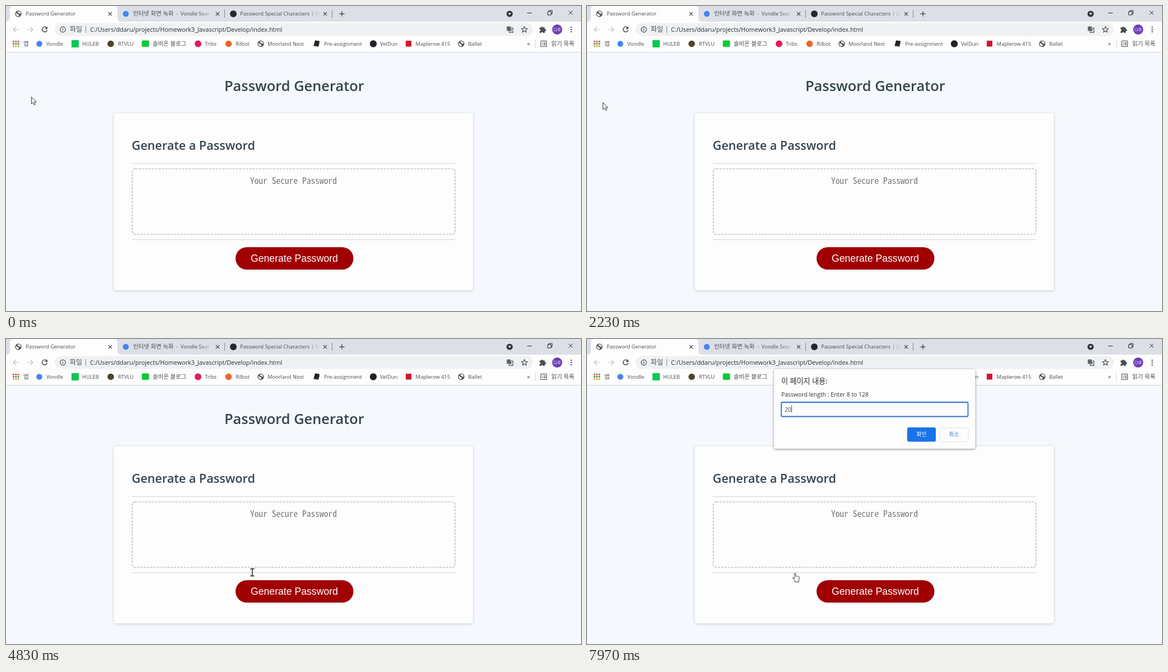
Write an HTML page that moves like this. It is 1027 px wide and 545 px high and loops after 8 s.

```html
<!DOCTYPE html>
<html lang="ko">
<head>
<meta charset="utf-8">
<title>Password Generator</title>
<style>
html, body { margin: 0; width: 100%; height: 100%; overflow: hidden; background: #f5f9fd; }
svg { display: block; width: 100%; height: 100%; }
text { font-family: "Open Sans", "Noto Sans CJK KR", "Noto Sans CJK", sans-serif; font-size: 9.35px; fill: #4a4d51; white-space: pre; }
.ko { font-size: 10.4px; }
.head { font-weight: 600; fill: #35444f; }
.mono { font: 15.5px "Noto Sans Mono CJK KR", "Noto Sans Mono", monospace; fill: #757575; }
.arial { font: 17.65px "Liberation Sans", Arial, sans-serif; fill: #fff; }
.line { fill: none; stroke: #4a4d51; stroke-width: 1.2; }
.soft { filter: drop-shadow(0 1px 2.5px rgba(60, 70, 90, .25)); }
.pop { filter: drop-shadow(0 1px 2px rgba(0, 0, 0, .45)); }

#mouse, #mouse > *, #dialog, #caret, #one, #two { animation: 8s linear infinite; }
#mouse { animation-name: move; }
#mouse > *, #caret, #one, #two { animation-timing-function: step-end; }
#arrow { animation-name: arrow; }
#beam { animation-name: beam; }
#hand { animation-name: hand; }
#dialog { animation-name: drop; }
#caret { animation-name: caret; }
#one { animation-name: one; }
#two { animation-name: two; }

@keyframes move {
  0% { transform: translate(45px, 162px); animation-timing-function: ease-in-out; }
  15%, 28.5% { transform: translate(28px, 172px); }
  37.1% { transform: translate(235px, 200px); }
  60.4% { transform: translate(440px, 417px); }
  64%, 72% { transform: translate(454.5px, 455px); animation-timing-function: ease-in-out; }
  81%, 100% { transform: translate(371.5px, 418px); }
}
@keyframes arrow { 0% { opacity: 1; } 46.8%, 100% { opacity: 0; } }
@keyframes beam { 0% { opacity: 0; } 46.8% { opacity: 1; } 61.6%, 100% { opacity: 0; } }
@keyframes hand { 0% { opacity: 0; } 61.6%, 100% { opacity: 1; } }
@keyframes drop {
  0%, 68.7% { opacity: 0; transform: translateY(-10px); }
  70.5% { opacity: .97; transform: translateY(-1.7px); }
  71.5%, 100% { opacity: 1; transform: none; }
}
@keyframes caret {
  0% { opacity: 1; transform: none; }
  75.4% { opacity: 0; transform: none; }
  82% { opacity: 1; transform: none; }
  88.6% { opacity: 0; transform: none; }
  93% { opacity: 1; transform: translateX(6px); }
  95.6%, 100% { opacity: 1; transform: translateX(11.5px); }
}
@keyframes one { 0% { opacity: 0; } 93%, 100% { opacity: 1; } }
@keyframes two { 0% { opacity: 0; } 95.6%, 100% { opacity: 1; } }
</style>
</head>
<body>
<svg viewBox="0 0 1027 545">
  <defs>
    <g id="globe">
      <circle r="5.7" fill="#55595e"/>
      <path d="M-4.4-1.5C-2-.5-1.5 1 .2 1.2S1 3.6-.8 4.4C-3.4 3.8-4.6 1.4-4.4-1.5zM-.6-4.4C2-4.6 4-3 4.4-.6 2.6.6 2-1 .4-1.2S-1.6-3.2-.6-4.4z" fill="#fff"/>
    </g>
    <path id="x" class="line" style="stroke-width:1.3" d="M-3-3 3 3M3-3-3 3"/>
    <linearGradient id="fade">
      <stop stop-color="#dce0e6" stop-opacity="0"/>
      <stop offset="1" stop-color="#dce0e6"/>
    </linearGradient>
  </defs>

  <!-- Tab strip -->
  <rect width="1027" height="28" fill="#dce0e6"/>
  <path d="M0 28Q7 28 7 21V6Q7 0 13 0H193Q199 0 199 6V21Q199 28 206 28z" fill="#fdfdfd"/>
  <use href="#globe" x="22" y="14"/>
  <text x="35" y="17.3">Password Generator</text>
  <circle cx="214" cy="14" r="5.3" fill="#4285f4"/>
  <text class="ko" x="227" y="17.3">인터넷 화면 녹화</text>
  <text x="304" y="17.3">-  Vondle Sear</text>
  <rect x="345" y="4" width="24" height="20" fill="url(#fade)"/>
  <rect x="369" y="4" width="5" height="20" fill="#dce0e6"/>
  <circle cx="406" cy="14" r="6" fill="#25282b"/>
  <text x="418" y="17.3">Password Special Characters | O</text>
  <rect x="540" y="4" width="21" height="20" fill="url(#fade)"/>
  <use href="#x" x="186" y="14"/>
  <use href="#x" x="378" y="14"/>
  <use href="#x" x="570" y="14"/>
  <path d="M390.5 7v14M582.5 7v14" stroke="#868a90"/>
  <path class="line" style="stroke-width:1.5" d="M595.5 14h9M600 9.5v9"/>
  <circle cx="899.5" cy="14" r="5.6" fill="#33363a"/>
  <path d="M896.7 12.6h5.6l-2.8 3.4z" fill="#fff"/>
  <path class="line" style="stroke:#222;stroke-width:1" d="M931 12.5h8M967.5 10h6v6h-6zM969.5 10V8h6v6h-2M1005 8.5l7 7M1012 8.5l-7 7"/>

  <!-- Toolbar -->
  <rect y="28" width="1027" height="54" fill="#fdfdfd"/>
  <path d="M0 82.5H1027" stroke="#d5d8dc"/>
  <path class="line" style="stroke:#bcbfc3" d="M23 42H13M17.500 37.500 13 42l4.500 4.500M38 42h10M43.500 37.500 48 42l-4.500 4.500"/>
  <path class="line" style="stroke-width:1.500" d="M72.800 39.200A4.500 4.500 0 1 0 73.500 43"/>
  <path d="M74 36.500v4.800h-4.800z" fill="#4a4d51"/>
  <rect x="87" y="30.500" width="854" height="23" rx="11.500" fill="#eff1f3"/>
  <circle class="line" cx="101.500" cy="42" r="4.800"/>
  <path class="line" d="M101.500 41v3.500M101.500 39v1.200"/>
  <text x="114" y="46" style="font-size:12px">파일</text>
  <path d="M142.500 36v12" stroke="#85898e"/>
  <text x="150" y="45.600" style="font-size:10.850px;fill:#2b2d30">C:/Users/ddaru/projects/Homework3_Javascript/Develop/index.html</text>
  <rect x="894.500" y="36.500" width="7" height="8" rx="1" fill="#5f6368"/>
  <path class="line" style="stroke-width:1" d="M902 39h3.500v8.500h-7V45M900 41.500h4.500M902 41c0 2-1 4-2.500 5M900.500 43l4 3.500"/>
  <path class="line" d="M926 36.800l1.500 3.500 3.800.3-2.900 2.500.9 3.700-3.300-2-3.300 2 .9-3.700-2.900-2.500 3.800-.3z"/>
  <path d="M953 38.500h3a1.700 1.700 0 1 1 3.400 0h3v3a1.800 1.800 0 1 1 0 3.500v3h-3.200a1.600 1.600 0 0 0-3.200 0h-3v-3a1.700 1.700 0 0 0 0-3.500z" fill="#4a4d51"/>
  <circle cx="984.500" cy="42" r="9" fill="#6c3cb4"/>
  <text x="984.500" y="44.700" text-anchor="middle" style="font-size:7.300px;fill:#fff">다루</text>
  <g fill="#4a4d51"><circle cx="1009.500" cy="38" r="1.200"/><circle cx="1009.500" cy="42" r="1.200"/><circle cx="1009.500" cy="46" r="1.200"/></g>

  <!-- Bookmarks -->
  <g stroke-width="2.800" stroke-dasharray="2.800 1.500">
    <path d="M12 63.400h11.400" stroke="#dd4b3e"/>
    <path d="M12 67.500h11.400" stroke="#3f9b5a"/>
    <path d="M12 71.600h11.400" stroke="#e8a62c"/>
  </g>
  <text class="ko" x="31" y="70.500">앱</text>
  <circle cx="59.500" cy="67.500" r="5.200" fill="#4285f4"/>
  <text x="72" y="70.500">Vondle</text>
  <rect x="117" y="61" width="13" height="13" fill="#06c755"/>
  <text x="136" y="70.500">HULEB</text>
  <circle cx="187" cy="67.500" r="5.800" fill="#4d4429"/>
  <text x="200" y="70.500">RTVLU</text>
  <rect x="242.500" y="61.500" width="13" height="11.500" rx="2" fill="#10c838"/>
  <text class="ko" x="262" y="70.500">솔비온 블로그</text>
  <circle cx="343" cy="67.500" r="6" fill="#e01e5a"/>
  <text x="355" y="70.500">Tribs</text>
  <circle cx="397.500" cy="67.500" r="5.800" fill="#f0642c"/>
  <text x="410" y="70.500">Rilbot</text>
  <use href="#globe" x="455" y="67.500"/>
  <text x="467" y="70.500">Moorland Nest</text>
  <path d="M552 61.500l8 1-2 9.500-8.500-1z" fill="#222"/>
  <path d="M549.500 71.500l8.500 1.200 2-8" fill="none" stroke="#777"/>
  <text x="568" y="70.500">Pre-assignment</text>
  <circle cx="656" cy="67.500" r="6.200" fill="#1f2328"/>
  <text x="668" y="70.500">VelDun</text>
  <rect x="714" y="62" width="10" height="10.500" fill="#d4142f"/>
  <text x="731.500" y="70.500">Maplerow 415</text>
  <use href="#globe" x="813" y="67.500"/>
  <text x="825.500" y="70.500">Ballet</text>
  <text x="930.500" y="70.500" style="font-size:11px">»</text>
  <path d="M945.500 60v15" stroke="#d5d8dc"/>
  <path class="line" style="stroke-width:1" d="M955 62.500h10.500v10H955zM957 65.500h1.500M960 65.500h4M957 67.500h1.500M960 67.500h4M957 69.500h1.500M960 69.500h4"/>
  <text class="ko" x="974" y="70.500">읽기 목록</text>

  <!-- Page -->
  <text class="head" x="390" y="151.500" style="font-size:25.400px">Password Generator</text>
  <rect class="soft" x="192.500" y="191.500" width="641.500" height="316.500" rx="4" fill="#fdfdfd"/>
  <text class="head" x="224.500" y="257" style="font-size:21.600px">Generate a Password</text>
  <path d="M225 281.500H802.500M225 417.500H802.500" stroke="#dcdde2" stroke-width="1.500"/>
  <rect x="225.500" y="291" width="576.500" height="117" rx="5" fill="none" stroke="#c2c2cb" stroke-width="1.700" stroke-dasharray="4 2"/>
  <text class="mono" x="436" y="318">Your Secure Password</text>
  <rect x="410" y="431" width="210.500" height="40" rx="20" fill="#a00002"/>
  <text class="arial" x="437" y="457.300">Generate Password</text>

  <g id="dialog">
    <rect class="pop" x="334" y="54" width="359.500" height="142" rx="3" fill="#fdfdfd"/>
    <text x="347" y="79.500" style="font-size:13.100px;fill:#2b2d30">이 페이지 내용:</text>
    <text x="347" y="102.500" style="font-size:10.400px;fill:#33363a">Password length : Enter 8 to 128</text>
    <rect x="347" y="113" width="333.500" height="25.500" rx="2" fill="#fdfdfd" stroke="#2e6fd0" stroke-width="1.800"/>
    <text id="one" x="353" y="129.500" style="font-size:10.200px">2</text>
    <text id="two" x="358.700" y="129.500" style="font-size:10.200px">0</text>
    <path id="caret" d="M353.500 118.500v13" stroke="#44474b"/>
    <rect x="572" y="158" width="51" height="25.500" rx="3" fill="#1a73e8"/>
    <text x="597.500" y="174" text-anchor="middle" style="font-size:9.800px;font-weight:500;fill:#fff">확인</text>
    <rect x="630" y="158.500" width="51" height="25" rx="3" fill="#fdfdfd" stroke="#e0e2e6"/>
    <text x="655.500" y="174" text-anchor="middle" style="font-size:9.800px;font-weight:500;fill:#3474d4">취소</text>
  </g>

  <g id="mouse">
    <path id="arrow" d="M.5.500v12.500l2.900-2.600 2.100 4.400 1.900-.9-2-4.300h3.900z" fill="#fff" stroke="#222" stroke-width=".9"/>
    <path id="beam" d="M-3.500-6.500h2.500l1 1 1-1h2.500M0-5.500V5.500M-3.500 6.500h2.500l1-1 1 1h2.500" fill="none" stroke="#111" stroke-width="1.400"/>
    <path id="hand" d="M-1 1Q0-.8 1.300 1V6.200L2.200 5.500 3.600 6.400 4.800 6 6 7 7.200 7Q8 7.500 7.800 10L6.600 13V16H-.2V14L-4 9.600Q-4.200 7.800-2.400 8.600L-1 10z" fill="#fff" stroke="#222" stroke-width=".9" stroke-linejoin="round"/>
  </g>
</svg>
</body>
</html>
```
